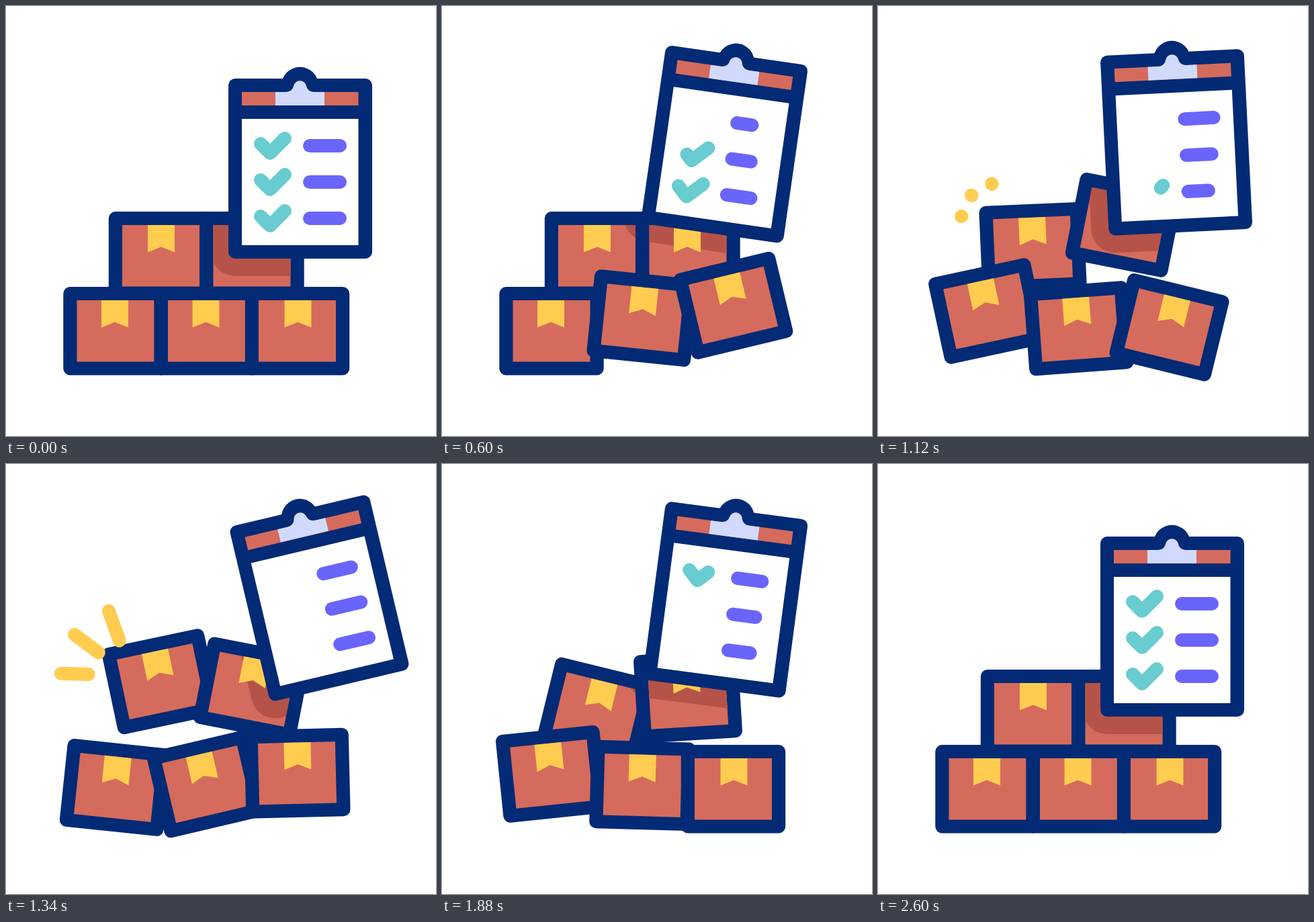
Animation of 640 by 640 pixels, one loop 3 s. Source, as an HTML page with a canvas:

```html
<!DOCTYPE html>
<html lang="en">
<head>
<meta charset="utf-8">
<title>Inventory check</title>
<style>
  html, body { margin: 0; width: 100%; height: 100%; overflow: hidden; background: #fff; }
  canvas { display: block; }
</style>
</head>
<body>
<canvas id="stage" width="640" height="640"></canvas>
<script>
const ctx = document.getElementById('stage').getContext('2d');
const LOOP = 3000;
const NAVY = '#032a75', RED = '#d56b5c', SHADE = '#b65348', YELLOW = '#ffcc4f';
const TEAL = '#68ccd0', VIOLET = '#6965fa', LAVENDER = '#d1dafd';

// Boxes in paint order; x, y is the centre, tag the left edge of the ribbon.
const BOXES = [
  { x: 230.5, y: 371.7, tag: 211, start: 1000, spin: -1, hop: [51, 33], shaded: true },
  { x: 366, y: 371.7, tag: 345, start: 800, spin: 1, hop: [51, 33], shaded: true },
  { x: 163, y: 483.7, tag: 142, start: 600, spin: -1, hop: [38, 25] },
  { x: 298.5, y: 483.7, tag: 277.5, start: 400, spin: 1, hop: [38, 25] },
  { x: 433.5, y: 483.7, tag: 414.5, start: 200, spin: -1, hop: [38, 25] }
];
const SPARKS = [
  [[124.5, 313], [59, 311]],
  [[139.5, 282], [82, 239]],
  [[169.5, 265], [144, 194]]
];
const PIVOT = { x: 437.5, y: 118.3 };

// Eased value at time t from [time, value] keys.
function track(t, ...keys) {
  if (t <= keys[0][0]) return keys[0][1];
  for (let i = 1; i < keys.length; i++) {
    const [t0, v0] = keys[i - 1], [t1, v1] = keys[i];
    if (t < t1) {
      const u = (t - t0) / (t1 - t0);
      return v0 + (v1 - v0) * u * u * (3 - 2 * u);
    }
  }
  return keys[keys.length - 1][1];
}

function fillRect(color, x, y, w, h, r = 0) {
  ctx.fillStyle = color;
  ctx.beginPath();
  ctx.roundRect(x, y, w, h, r);
  ctx.fill();
}

function fillPath(color, d) {
  ctx.fillStyle = color;
  ctx.fill(new Path2D(d));
}

// Round polyline, visible between the fractions a and b of its length.
function trimmedLine(color, points, a = 0, b = 1) {
  if (a >= b) return;
  let length = 0;
  ctx.beginPath();
  points.forEach(([x, y], i) => {
    ctx.lineTo(x, y);
    if (i) length += Math.hypot(x - points[i - 1][0], y - points[i - 1][1]);
  });
  ctx.setLineDash([length * (b - a), 1000]);
  ctx.lineDashOffset = -length * a;
  ctx.strokeStyle = color;
  ctx.lineWidth = 20;
  ctx.lineCap = ctx.lineJoin = 'round';
  ctx.stroke();
}

// Draws in rest coordinates, lifted and turned about (x, y).
function posed({ x, y, dy, angle }, draw) {
  ctx.save();
  ctx.translate(x, y + dy);
  ctx.rotate(angle * Math.PI / 180);
  ctx.translate(-x, -y);
  draw();
  ctx.restore();
}

function boardPose(t) {
  return {
    ...PIVOT,
    dy: track(t, [200, 0], [700, -39], [2100, -39], [2600, 0]),
    angle: track(t, [200, 0], [800, 11], [1400, -14], [2000, 10], [2500, 0])
  };
}

function drawBox(box, t, board) {
  const { x, y, tag, spin, hop } = box;
  const local = t - box.start;
  const pose = {
    x, y,
    dy: -track(local, [0, 0], [400, hop[0]], [800, 0], [1200, hop[1]], [1600, 0]),
    angle: spin * track(local, [0, 0], [450, 14], [900, -14], [1250, 6], [1600, 0])
  };
  const top = y - 45.7;
  posed(pose, () => {
    fillRect(NAVY, x - 77.7, y - 65.7, 155.4, 131.4, 10);
    fillRect(RED, x - 57.5, top, 115, 91.4);
  });
  if (box.shaded) {
    ctx.save();
    const inner = new Path2D();
    inner.rect(x - 57.5, top, 115, 91.4);
    const m = new DOMMatrix().translate(x, y + pose.dy).rotate(pose.angle).translate(-x, -y);
    const clip = new Path2D();
    clip.addPath(inner, m);
    ctx.clip(clip);
    posed(board, () => fillRect(SHADE, 305, 108, 240, 294, 36));
    ctx.restore();
  }
  posed(pose, () => fillPath(YELLOW, `M${tag} ${top}h40v40.5l-20-8l-20 8z`));
}

function drawBoard(t) {
  fillRect(NAVY, 331, 108, 214, 268, 10);
  ctx.beginPath();
  ctx.arc(PIVOT.x, PIVOT.y, 27.5, 0, 2 * Math.PI);
  ctx.fill();
  fillRect(RED, 351, 128, 173.5, 20);
  fillPath(LAVENDER, 'M401 148V128H416c7 0 11-4 12-9a9.7 9.7 0 0 1 19 0c1 5 5 9 12 9H474V148z');
  fillRect('#fff', 351, 168, 173.5, 188);

  for (let row = 0; row < 3; row++) {
    const y = 208 + 54 * row;
    const out = 200 + 300 * row, back = 1600 + 300 * row;
    const check = [[379, y - 3], [393, y + 11], [415, y - 11]];
    if (t < back) trimmedLine(TEAL, check, track(t, [out, 0], [out + 400, 1]), 1);
    else trimmedLine(TEAL, check, 0, track(t, [back, 0], [back + 400, 1]));

    const size = track(t - 100 * row, [200, 45], [700, 20], [1200, 45], [1700, 33], [2200, 45]);
    trimmedLine(VIOLET, [[452, y], [452 + size, y]]);
  }
}

function render(t) {
  ctx.fillStyle = '#fff';
  ctx.fillRect(0, 0, 640, 640);
  const board = boardPose(t);
  BOXES.forEach(box => drawBox(box, t, board));
  const tail = track(t, [1300, 0], [1700, 1]);
  const head = track(t, [1100, 0], [1500, 1]);
  SPARKS.forEach(line => trimmedLine(YELLOW, line, tail, head));
  posed(board, () => drawBoard(t));
}

function tick() {
  render(performance.now() % LOOP);
  requestAnimationFrame(tick);
}
tick();
</script>
</body>
</html>
```
